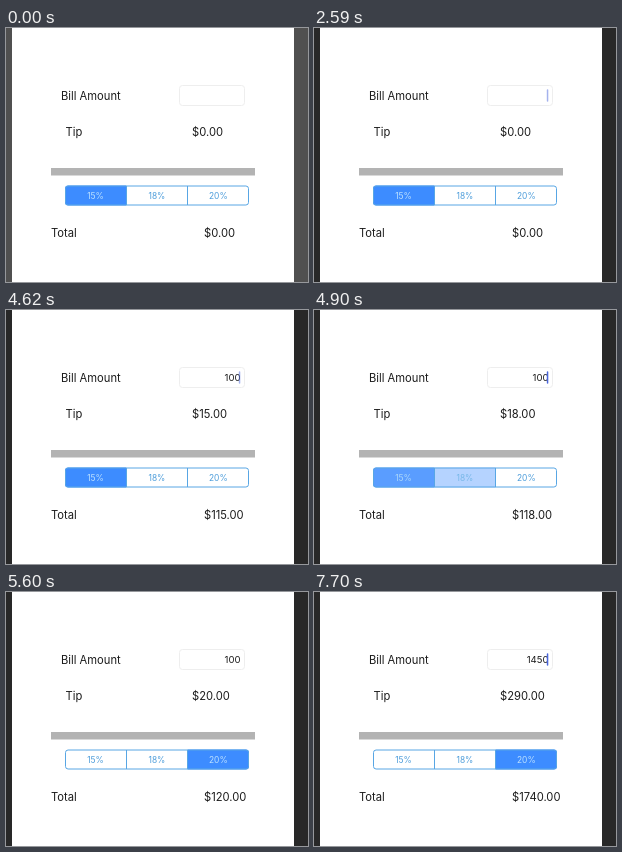
Write an HTML page that moves like this. It is 302 px wide and 254 px high and loops after 8000 ms.

```html
<!DOCTYPE html>
<html lang="en">
<head>
<meta charset="utf-8">
<title>Tip calculator</title>
<style>
  html, body { margin: 0; width: 100%; height: 100%; overflow: hidden; background: #fff; }
  svg { display: block; width: 302px; height: 254px; }
  text { font: 11.2px Inter, "Liberation Sans", sans-serif; fill: #1c1c1c; }
  .entry { font-size: 9.6px; text-anchor: end; }
  .label { font-size: 8.4px; text-anchor: middle; }
  .side { fill: #282828; animation: side 8s step-end infinite; }
  @keyframes side { 0% { fill: #505050; } 10.5% { fill: #282828; } }
</style>
</head>
<body>
<svg viewBox="0 0 302 254">
  <rect width="302" height="254" fill="#fff"/>
  <path class="side" d="M0 0H6V254H0ZM288 0H302V254H288Z"/>

  <text x="55" y="72">Bill Amount</text>
  <rect x="173.5" y="57.5" width="65" height="20" rx="3" fill="#fff" stroke="#eee"/>
  <text id="bill" class="entry" x="234.5" y="71.3"></text>
  <rect id="caret" x="232.8" y="61.3" width="1.5" height="12.4" rx=".7" fill="#4a66dc"/>

  <text x="59.5" y="108">Tip</text>
  <text id="tip" x="186" y="108"></text>
  <rect x="45" y="140" width="204" height="7.5" fill="#b3b3b3"/>

  <clipPath id="round"><rect x="59" y="157.5" width="184" height="20" rx="3"/></clipPath>
  <g id="segments" clip-path="url(#round)"></g>
  <path d="M120.5 158V177M181.5 158V177" stroke="#58a6e4"/>
  <rect x="59.5" y="158" width="183" height="19" rx="2.6" fill="none" stroke="#58a6e4"/>

  <text x="45" y="208.6">Total</text>
  <text id="total" x="198" y="208.6"></text>
</svg>
<script>
const LOOP = 8000, STEP = 70;
const $ = id => document.getElementById(id);

// [time, value] lists
const typed = [[0, ''], [2800, '1'], [2870, '10'], [3430, '100'], [6580, '10'],
  [6720, '1'], [7140, '14'], [7490, '145'], [7700, '1450']];
const rates = [[0, 15], [4900, 18], [5460, 20]];
const caret = [[0, 0], [1470, 0], [1540, 1], [1960, 1], [2170, 0], [2520, 0], [2660, 1],
  [4060, 1], [4270, 0], [4550, 0], [4690, 1], [5110, 1], [5320, 0], [5600, 0], [5740, 1],
  [6160, 1], [6370, 0], [6510, 0], [6580, 1], [LOOP, 1]];

const rise = t => [[t, 0], [t + 70, .18], [t + 140, .38], [t + 210, .75], [t + 280, 1]];
const fall = t => [[t, 1], [t + 140, .85], [t + 210, .35], [t + 280, 0]];
const tracks = [fall(4760), [...rise(4760), ...fall(5320)], rise(5320)];

const latest = (list, t) => list.filter(k => k[0] <= t).pop()[1];

function tween(list, t) {
  const i = list.findIndex(k => k[0] > t);
  if (i < 0) return list[list.length - 1][1];
  if (i === 0) return list[0][1];
  const [a, va] = list[i - 1], [b, vb] = list[i];
  return va + (vb - va) * (t - a) / (b - a);
}

function mix(from, to, p) {
  return `rgb(${from.map((c, i) => Math.round(c + (to[i] - c) * p))})`;
}

function add(tag, attrs, text = '') {
  const el = document.createElementNS('http://www.w3.org/2000/svg', tag);
  for (const k in attrs) el.setAttribute(k, attrs[k]);
  el.textContent = text;
  return $('segments').appendChild(el);
}

const segments = ['15%', '18%', '20%'].map((name, i) => ({
  fill: add('rect', { x: 59 + i * 61.3, y: 157, width: 61.4, height: 21 }),
  label: add('text', { class: 'label', x: 89.5 + i * 61.4, y: 170.8 }, name)
}));

const setText = (id, s) => { if ($(id).textContent !== s) $(id).textContent = s; };

function draw(now) {
  const t = Math.floor(now % LOOP / STEP) * STEP;
  const bill = latest(typed, t);
  const tip = bill * latest(rates, t) / 100;
  setText('bill', bill);
  setText('tip', '$' + tip.toFixed(2));
  setText('total', '$' + (+bill + tip).toFixed(2));
  $('caret').style.opacity = tween(caret, t);
  segments.forEach((s, i) => {
    const p = tween(tracks[i], t);
    s.fill.style.fill = mix([255, 255, 255], [61, 140, 255], p);
    s.label.style.fill = mix([76, 156, 218], [190, 226, 255], p);
  });
  requestAnimationFrame(draw);
}
draw(performance.now());
</script>
</body>
</html>
```
